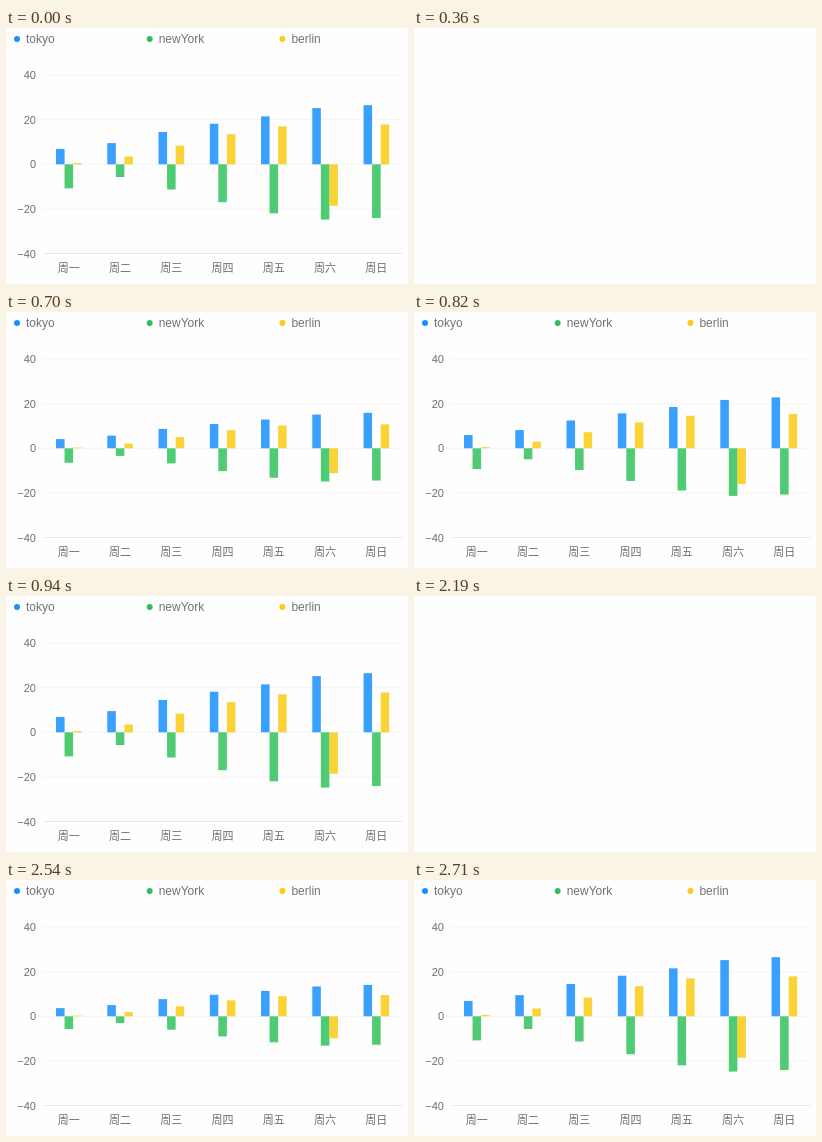
Recreate the animation shown at these times as an HTML page. Size 402 by 256 pixels, loop 3.61 s.

```html
<!DOCTYPE html>
<html lang="zh-CN">
<head>
<meta charset="utf-8">
<style>
  html, body { margin: 0; width: 402px; height: 256px; overflow: hidden; background: #fefefe; }
  svg { display: block; }
  text { font: 11px "Liberation Sans", "Noto Sans CJK SC", "Noto Sans CJK", sans-serif; fill: #6e6e6e; }
  .legend { font-size: 12px; fill: #737373; }
  .value { text-anchor: end; }
  .day { text-anchor: middle; }
</style>
</head>
<body>
<svg width="402" height="256" viewBox="0 0 402 256"><g id="chart"></g></svg>
<script>
const LOOP = 3610, GROW = 460;
const LEFT = 37.2, RIGHT = 396, ZERO = 136.3, UNIT = 2.23;
const days = ['周一', '周二', '周三', '周四', '周五', '周六', '周日'];
const series = [
  { name: 'tokyo', color: '#1890ff', data: [6.9, 9.5, 14.5, 18.2, 21.5, 25.2, 26.5] },
  { name: 'newYork', color: '#2fc25b', data: [-10.8, -5.7, -11.3, -17, -22, -24.8, -24.1] },
  { name: 'berlin', color: '#facc14', data: [0.6, 3.5, 8.4, 13.5, 17, -18.6, 17.9] }
];
const chart = document.getElementById('chart');
const step = (RIGHT - LEFT) / days.length, barWidth = step / 6;

function add(tag, attrs, text = '') {
  const el = document.createElementNS('http://www.w3.org/2000/svg', tag);
  for (const key in attrs) el.setAttribute(key, attrs[key]);
  el.textContent = text;
  chart.append(el);
  return el;
}

for (let v = -40; v <= 40; v += 20) {
  const y = ZERO - v * UNIT;
  add('line', {
    x1: LEFT, x2: RIGHT, y1: y, y2: y, stroke: '#e8e8e8',
    'stroke-dasharray': v === -40 ? 'none' : 2
  });
  add('text', { class: 'value', x: 30, y: y + 4 }, String(v).replace('-', '−'));
}
days.forEach((day, i) =>
  add('text', { class: 'day', x: LEFT + (i + 0.5) * step, y: 244.3 }, day));

const bars = [];
series.forEach(({ name, color, data }, s) => {
  const x = 11 + s * 132.7;
  add('circle', { cx: x, cy: 11, r: 3, fill: color });
  add('text', { class: 'legend', x: x + 9, y: 15.2 }, name);
  data.forEach((value, i) => {
    const el = add('rect', {
      x: LEFT + (i + 0.25) * step + s * barWidth,
      width: barWidth, fill: color, opacity: 0.85
    });
    bars.push({ el, value });
  });
});

// Bar growth from 0 to 1, or -1 while the chart is cleared; advances in 60 ms ticks.
function growth(t) {
  if (t < 360 || (t >= 940 && t < 2190) || t >= 2710) return 1;
  if (t < 470 || (t >= 2190 && t < 2250)) return -1;
  const [origin, start] = t < 940 ? [460, 424] : [2190, 2246];
  const tick = origin + Math.floor((t - origin) / 60) * 60;
  return Math.min(1, (tick - start) / GROW);
}

function draw() {
  const p = growth(performance.now() % LOOP);
  chart.style.display = p < 0 ? 'none' : '';
  for (const { el, value } of bars) {
    const h = value * UNIT * Math.max(p, 0);
    el.setAttribute('y', ZERO - Math.max(h, 0));
    el.setAttribute('height', Math.abs(h));
  }
  requestAnimationFrame(draw);
}
draw();
</script>
</body>
</html>
```
